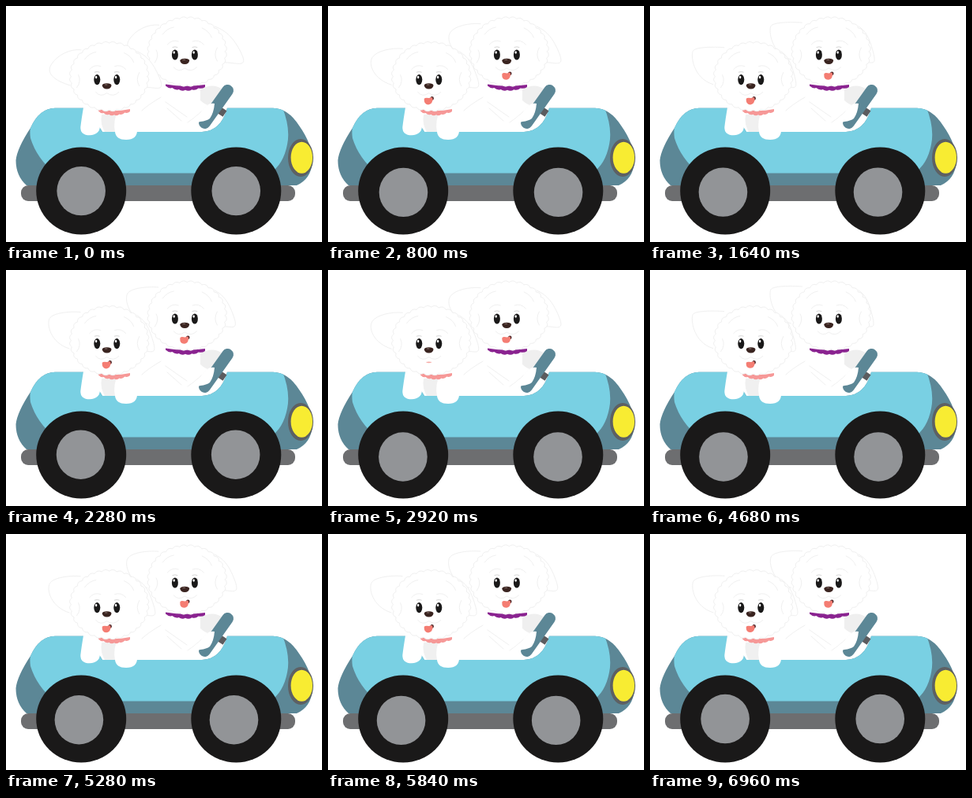
An HTML page with a canvas for the animation above (7 s loop, 400x300 px).

```html
<!DOCTYPE html>
<html lang="en">
<head>
<meta charset="utf-8">
<title>Two dogs driving</title>
<style>
html, body { margin: 0; width: 100%; height: 100%; overflow: hidden; background: #fff; }
canvas { display: block; width: 400px; height: 300px; }
</style>
</head>
<body>
<canvas id="stage" width="400" height="300"></canvas>
<script>
const ctx = document.getElementById('stage').getContext('2d');
const LOOP = 7000, TAU = Math.PI * 2;
const STEEL = '#5c8796', SKY = '#79d0e3', GREY = '#6d6e70', INK = '#1a1919', FUR = '#f0f0f0';

const mix = (a, b, k) => a + (b - a) * k;
const clamp = v => Math.max(0, Math.min(1, v));

function shape(d, fill, stroke, width = 1) {
  const p = new Path2D(d);
  if (fill) { ctx.fillStyle = fill; ctx.fill(p); }
  if (stroke) { ctx.strokeStyle = stroke; ctx.lineWidth = width; ctx.stroke(p); }
}

function oval(x, y, rx, ry, fill) {
  ctx.beginPath();
  ctx.ellipse(x, y, rx, ry, 0, 0, TAU);
  ctx.fillStyle = fill;
  ctx.fill();
}

function bar(x1, y1, x2, y2, width, color, cap = 'round') {
  ctx.beginPath();
  ctx.moveTo(x1, y1);
  ctx.lineTo(x2, y2);
  ctx.lineCap = cap;
  ctx.lineWidth = width;
  ctx.strokeStyle = color;
  ctx.stroke();
}

// Closed ellipse whose edge is made of small curls
function fluffy(cx, cy, rx, ry, curls) {
  const at = (i, k) => [cx + rx * k * Math.cos(i / curls * TAU), cy + ry * k * Math.sin(i / curls * TAU)];
  ctx.beginPath();
  ctx.moveTo(...at(0, 0.965));
  for (let i = 0; i < curls; i++) ctx.quadraticCurveTo(...at(i + 0.5, 1.055), ...at(i + 1, 0.965));
  ctx.fillStyle = '#fff';
  ctx.fill();
  ctx.strokeStyle = FUR;
  ctx.lineWidth = 1;
  ctx.stroke();
}

// Lobe blended between a hanging and a lifted outline
function ear(hang, lift, k) {
  const p = hang.map((v, i) => mix(v, lift[i], k).toFixed(2));
  shape(`M${p[0]} ${p[1]}C${p.slice(2, 8).join(' ')}S${p.slice(8, 12).join(' ')}`, '#fff', FUR);
}

function tongue(out) {
  if (out < 0.05) return;
  if (out < 0.35) {
    shape('M-4 23.5Q0 26 4 23.5Q0 22.5 -4 23.5Z', '#f6a9a4');
    return;
  }
  const low = mix(27, 31.8, out);
  oval(4, 23.8, 2.2, 2.4, '#4a2426');
  shape(`M-6 24.5Q-5 22.4 0 23.4L4.2 22.4Q5.6 25 4.2 28Q3 ${low} -1 ${low}Q-6.5 ${low} -6 24.5Z`, '#f47d73');
}

function head(x, y, rightLift, leftLift, out) {
  ctx.save();
  ctx.translate(x, y);
  ear([-32, -36, -45, -38, -57, -26, -68, -10, -62, 3, -46, 8],
      [-34, -41, -48, -42, -71, -42, -73.5, -37, -74, -2, -48, 6], leftLift);
  ear([38, -36, 50, -32, 62, -24, 73, -2, 64, 8, 46, 10],
      [38, -36, 46, -30, 50, -24, 55, -4, 53, 8, 44, 10], rightLift);
  fluffy(3, -4, 50, 44, 32);
  shape('M-38 10Q-32 2 -36 -6M41 8Q36 0 41 -9M-22 -13Q-16 -20 -8 -17M10 -17Q18 -20 24 -13M-14 16Q-8 23 0 17Q8 23 15 16M-28 -26Q-22 -34 -14 -35M22 -34Q31 -30 34 -22', null, FUR);
  for (const side of [-12.4, 12.6]) {
    oval(side, 0, 4, 6.6, INK);
    oval(side - 1.2, -3, 1.2, 1.8, '#fff');
    shape(`M${side - 3} -9.5Q${side} -11 ${side + 3} -9.5`, null, '#d6d6d6');
  }
  tongue(out);
  shape('M-6 7.4Q-5.5 4.7 0 4.7Q5.6 4.7 5.8 7.4Q5.3 11.6 0 12Q-5.4 11.6 -6 7.4Z', '#3a2420');
  oval(-1, 6.4, 2, .7, '#79645f');
  ctx.restore();
}

// Band with a wavy lower edge
function collar(x1, y1, x2, y2, color) {
  const n = 6, step = (x2 - x1) / n;
  const base = k => mix(y1, y2, k) + 5 * Math.sin(k * Math.PI);
  let d = `M${x1} ${y1}Q${(x1 + x2) / 2} ${(y1 + y2) / 2 + 4} ${x2} ${y2}L${x2} ${y2 + 3}`;
  for (let i = n; i > 0; i--) {
    d += `Q${x1 + (i - .5) * step} ${base((i - .5) / n) + 4.5} ${x1 + (i - 1) * step} ${base((i - 1) / n) + 2}`;
  }
  shape(d + 'Z', color);
}

function driver(right, left, out) {
  shape('M199 96Q176 124 176 160H255Q262 126 252 98Z', '#fff');
  shape('M246 106Q262 97 274 106L262 128Q252 126 246 120Z', '#efefef');
  shape('M196 116Q179 126 172 133M202 122Q216 132 229 141M204 130L222 146M257 124Q245 138 230 148', null, FUR);
  collar(202, 99.5, 252, 100, '#8a2390');
  head(226.3, 62, right, left, out);
}

function passenger(right, left, out) {
  shape('M116 131Q135 122 160 131L168 160H123Q119 148 116 131Z', '#fff');
  shape('M121 138L145 135L140 160H125Q119 150 121 138Z', '#f0f0f0');
  shape('M98 129Q95.5 144 94.3 154Q94 164.3 106 164.3Q118.5 163.5 119 153Q118 143 121 132Z', '#fff');
  shape('M142 133Q135 146 138 160Q139 170 152 170Q166 170 166 158Q165 139 157 132Z', '#fff');
  collar(117, 131.5, 157, 131, '#f69897');
  head(127.7, 93.6, right, left, out);
}

const BODY = 'M62 129.7H100Q114 146 122 160H248Q272 159 280 129.7H338Q357 130 371 152Q388 176 388 198Q386 220 368 228H26Q12.5 216 12.5 196Q14 181 31 155Q42 130 62 129.7Z';

function car() {
  ctx.beginPath();
  ctx.roundRect(19, 228, 347, 20, 9);
  ctx.fillStyle = GREY;
  ctx.fill();
  shape(BODY, STEEL);
  ctx.save();
  ctx.clip(new Path2D(BODY));
  shape('M38 120H346Q361 152 356 176Q351 202 334 212.5H62Q39 194 31 168Q29 154 34 148Z', SKY);
  ctx.restore();
  oval(373, 193, 16, 24, '#5d6063');
  oval(374.3, 192.7, 13.7, 20, '#f8ec32');
}

function steering() {
  bar(268, 131, 277, 137, 9, '#5b5c5f', 'butt');
  bar(251.5, 148.5, 280.5, 107.5, 15, STEEL);
  shape('M246 136Q254 122 264 124Q263 136 258 143Q254 146 246 147Q238 150 230 149Z', '#fff');
}

function wheels(t) {
  const a = -TAU / 8 + TAU * 34 * clamp(t / 6500);
  const dx = 1.6 * Math.cos(a), dy = 1.6 * Math.sin(a);
  for (const x of [95.2, 291.3]) {
    oval(x, 235, 57, 55.5, INK);
    oval(x - 1.2 + dx, 236.2 + dy, 30.8, 31.2, '#929497');
  }
}

// Panting: the tongue slips in briefly once per period
function pant(t, period, closed, ramp) {
  const k = (t - closed) / period;
  return clamp(Math.abs(k - Math.round(k)) * period / ramp);
}

function draw(t) {
  const beat = t * 0.008866 % 1;
  const swing = 1 - Math.abs(1 - 2 * beat);
  const flap = Math.pow(swing, 0.6), gust = Math.pow(swing, 0.25);
  ctx.fillStyle = '#fff';
  ctx.fillRect(0, 0, 400, 300);
  driver(flap, gust, pant(t, 936, 0, 140));
  car();
  steering();
  wheels(t);
  passenger(gust, gust, pant(t, 835, 2900, 125) * clamp(t / 150));
}

const start = performance.now();
function tick(now) {
  draw(Math.max(0, now - start) % LOOP);
  requestAnimationFrame(tick);
}
draw(0);
requestAnimationFrame(tick);
</script>
</body>
</html>
```
